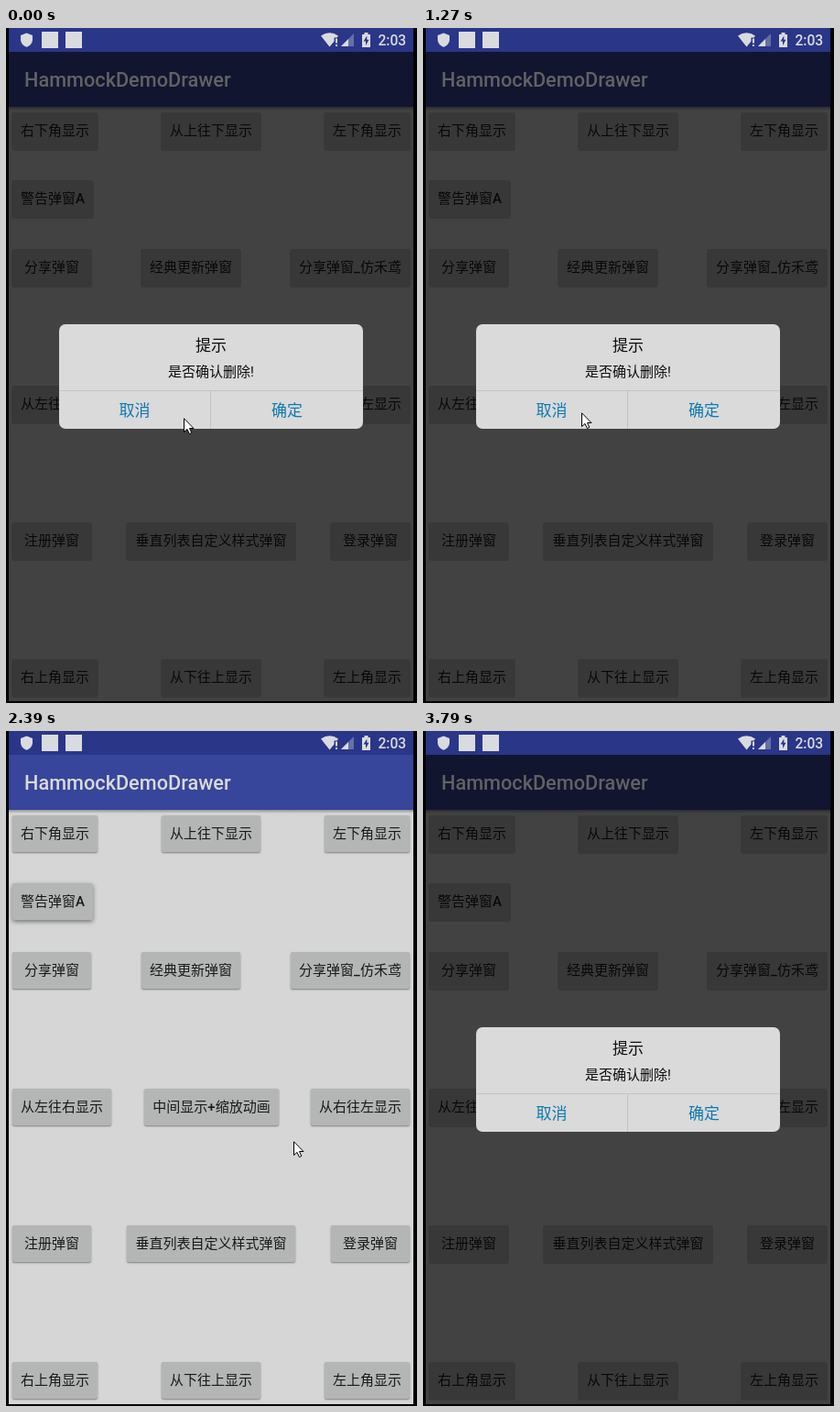
An HTML page for the animation above (4.38 s loop, 449 px wide and 736 px high).

```html
<!DOCTYPE html>
<html lang="zh-CN">
<head>
<meta charset="utf-8">
<title>Popup demo</title>
<style>
  html, body { margin: 0; width: 100%; height: 100%; overflow: hidden; background: #000; }
  body { position: relative; font-family: Roboto, "Noto Sans CJK SC", "Noto Sans CJK", sans-serif; }
  body * { position: absolute; box-sizing: border-box; white-space: nowrap; }

  .status { left: 0; top: 0; width: 449px; height: 26px; }
  .screen { left: 3px; top: 26px; width: 442px; height: 708px; background: #d6d6d6; overflow: hidden; }
  .bar { left: 0; top: 0; width: 442px; height: 60px; background: #37459b; }
  .bar::after {
    content: ""; position: absolute; left: 0; top: 60px; width: 100%; height: 4px;
    background: linear-gradient(rgba(0,0,0,.3), rgba(0,0,0,0));
  }
  .title {
    left: 20px; top: 27px; font-size: 21.7px; font-weight: 500; line-height: 60px;
    animation: title 4380ms step-end infinite;
  }

  /* page coordinates inside the screen */
  .page { left: -3px; top: -26px; }
  .btn {
    left: calc(var(--x) * 1px); top: calc(var(--y) * 1px); width: calc(var(--w) * 1px); height: 40px;
    border-radius: 2px; background: #b4b6b5; color: #181818;
    font-size: 15px; font-weight: 500; line-height: 41px; text-align: center;
    animation: shade 4380ms step-end infinite;
  }
  .btn.alert { animation-name: alert; }
  .scrim { inset: 0; background: rgba(0,0,0,.69); }

  .dialog {
    left: 58px; top: 323px; width: 332px; height: 114px; border-radius: 7px;
    background: #dadada; color: #0c0c0c; text-align: center;
  }
  .dialog div { left: 0; width: 100%; }
  .dialog .head { top: 13px; font-size: 17px; line-height: 21px; }
  .dialog .text { top: 42px; font-size: 15px; line-height: 20px; }
  .dialog .row { top: 72px; height: 42px; border-top: 1px solid #c3c3c3; }
  .row span { top: 0; height: 41px; width: 165px; font-size: 17px; line-height: 42px; color: #0a79b3; }
  .row .no { left: 0; }
  .row .yes { left: 165px; width: 167px; border-left: 1px solid #c3c3c3; }
  .scrim, .dialog { animation: popup 4380ms step-end infinite; }

  .cursor { left: 0; top: 0; width: 13px; height: 19px; overflow: visible; animation: cursor 4380ms step-end infinite; }

  @keyframes popup {
    0% { visibility: visible }
    36.07% { visibility: hidden }
    57.53%, 100% { visibility: visible }
  }
  @keyframes title {
    0% { color: #626262 }
    36.07% { color: #dadada }
    57.53%, 100% { color: #626262 }
  }
  @keyframes shade {
    0% { box-shadow: 0 1px 0 1px #b4b6b5 }
    36.07% { box-shadow: 0 1px 2px rgba(0,0,0,.42) }
    57.53%, 100% { box-shadow: 0 1px 0 1px #b4b6b5 }
  }
  @keyframes alert {
    0% { box-shadow: 0 1px 0 1px #b4b6b5 }
    36.07% { box-shadow: 0 1px 2px rgba(0,0,0,.42); background: #a9abaa }
    38.81% { box-shadow: 0 1px 2px rgba(0,0,0,.42); background: #b4b6b5 }
    48.4% { box-shadow: 0 2px 3px rgba(0,0,0,.42) }
    54.56% { box-shadow: 0 2px 5px rgba(0,0,0,.45) }
    57.53% { box-shadow: 0 1px 0 3px #b4b6b5 }
    60.95%, 100% { box-shadow: 0 1px 0 1px #b4b6b5 }
  }
  @keyframes cursor {
    0% { transform: translate(194px, 425px) }
    3.65% { transform: translate(197px, 425px) }
    10.73% { transform: translate(176px, 425px) }
    14.15% { transform: translate(167px, 424px) }
    16.89% { transform: translate(164px, 422px) }
    20.09% { transform: translate(149px, 410px) }
    22.83% { transform: translate(194px, 419px) }
    26.25% { transform: translate(181px, 419px) }
    28.99% { transform: translate(173px, 419px) }
    36.07% { transform: translate(114px, 272px) }
    38.81% { transform: translate(87px, 209px) }
    42.23% { transform: translate(71px, 182px) }
    45.66% { transform: translate(92px, 204px) }
    48.4% { transform: translate(205px, 322px) }
    51.14% { transform: translate(297px, 419px) }
    54.56% { transform: translate(314px, 447px) }
    57.53% { transform: translate(299px, 471px) }
    60.95% { transform: translate(255px, 448px) }
    63.69% { transform: translate(350px, 422px) }
    70.54% { transform: translate(338px, 418px) }
    73.28% { transform: translate(323px, 416px) }
    76.71% { transform: translate(321px, 520px) }
    79.68% { transform: translate(344px, 648px) }
    83.33% { transform: translate(339px, 668px); visibility: visible }
    86.52%, 100% { transform: translate(339px, 668px); visibility: hidden }
  }
</style>
</head>
<body>
  <div class="screen">
    <div class="bar"></div>
    <div class="page">
      <div class="btn" style="--x:7;--y:92;--w:93">右下角显示</div>
      <div class="btn" style="--x:170;--y:92;--w:108">从上往下显示</div>
      <div class="btn" style="--x:348;--y:92;--w:93">左下角显示</div>

      <div class="btn alert" style="--x:7;--y:166;--w:88">警告弹窗A</div>

      <div class="btn" style="--x:7;--y:241;--w:86">分享弹窗</div>
      <div class="btn" style="--x:148;--y:241;--w:108">经典更新弹窗</div>
      <div class="btn" style="--x:311;--y:241;--w:130">分享弹窗_仿禾鸢</div>

      <div class="btn" style="--x:7;--y:390;--w:108">从左往右显示</div>
      <div class="btn" style="--x:151;--y:390;--w:147">中间显示+缩放动画</div>
      <div class="btn" style="--x:333;--y:390;--w:108">从右往左显示</div>

      <div class="btn" style="--x:7;--y:539;--w:86">注册弹窗</div>
      <div class="btn" style="--x:132;--y:539;--w:184">垂直列表自定义样式弹窗</div>
      <div class="btn" style="--x:355;--y:539;--w:86">登录弹窗</div>

      <div class="btn" style="--x:7;--y:688;--w:93">右上角显示</div>
      <div class="btn" style="--x:170;--y:688;--w:108">从下往上显示</div>
      <div class="btn" style="--x:348;--y:688;--w:93">左上角显示</div>
    </div>
    <div class="scrim"></div>
  </div>

  <div class="title">HammockDemoDrawer</div>

  <svg class="status" viewBox="0 0 449 26" fill="#dadbdf">
    <rect x="3" width="442" height="26" fill="#2a3688"/>
    <path d="M22.5 5.5 L29 8 V12.5 C29 16.5 26 19.5 22.5 20.8 C19 19.5 16 16.5 16 12.5 V8 Z"/>
    <rect x="39" y="4" width="18" height="18"/>
    <rect x="65" y="4" width="18" height="18"/>
    <path d="M344 8.5 Q353.5 2 363 8.5 L361.5 10.5 H358.5 V14.5 L353.5 20.5 Z"/>
    <path d="M360 11.5 h2 v5 h-2 z M360 18 h2 v2 h-2 z"/>
    <path d="M380 6 V20 H366 Z" opacity=".35"/>
    <path d="M374 12 V20 H366 Z"/>
    <path d="M389 7 H391.5 V5 H395.5 V7 H398 V21 H389 Z"/>
    <path d="M394.3 8.5 L390.6 14.5 H393 V19 L396.5 12.8 H394.3 Z" fill="#2a3688"/>
    <text x="406.5" y="19" font-size="15.6" font-weight="500">2:03</text>
  </svg>

  <div class="dialog">
    <div class="head">提示</div>
    <div class="text">是否确认删除!</div>
    <div class="row"><span class="no">取消</span><span class="yes">确定</span></div>
  </div>

  <svg class="cursor" viewBox="0 0 13 19">
    <path d="M.5 .8 V15.6 L4 12.4 L6.4 17.6 L8.8 16.5 L6.5 11.5 H11 Z" fill="#fff" stroke="#000"/>
  </svg>
</body>
</html>
```
